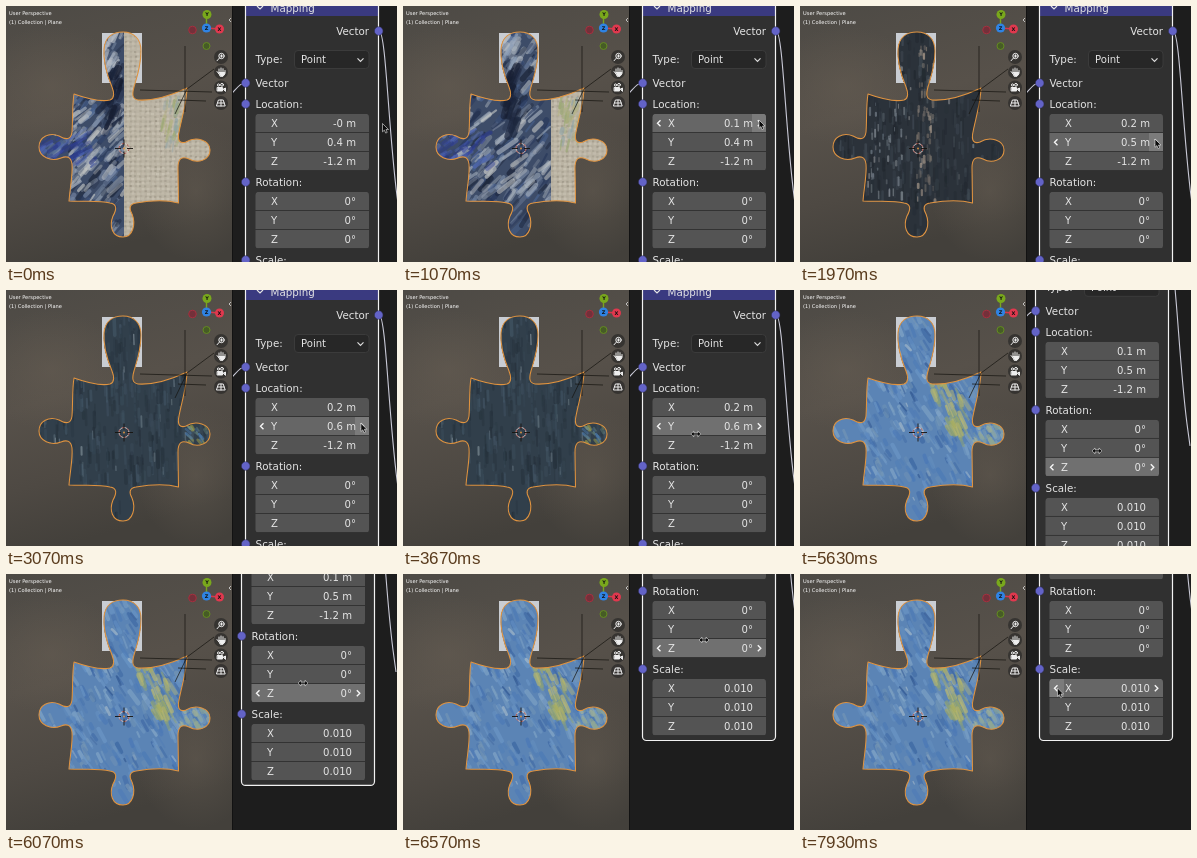
An HTML page with a canvas that plays this animation: 391 by 256 pixels, repeating every 8000 ms.

```html
<!DOCTYPE html>
<html lang="en">
<head>
<meta charset="utf-8">
<title>Mapping node</title>
<style>
html, body { margin: 0; width: 100%; height: 100%; overflow: hidden; background: #1d1d1d; }
#stage { position: relative; width: 391px; height: 256px; overflow: hidden; }
#stage > * { position: absolute; left: 0; top: 0; display: block; }
#stage > #editor { left: 226px; }
text { font: 10.1px "DejaVu Sans", sans-serif; fill: #e4e4e4; white-space: pre; }
.label { font-size: 10.3px; }
.info { font-size: 5.1px; fill: #fff; }
.axis { font-size: 5px; font-weight: bold; fill: #111; text-anchor: middle; }
.end { text-anchor: end; }
</style>
</head>
<body>
<div id="stage">
  <svg width="226" height="256">
    <defs>
      <linearGradient id="wall" x1="0" y1="0" x2=".25" y2="1">
        <stop offset="0" stop-color="#4d4a45"/>
        <stop offset=".45" stop-color="#57514a"/>
        <stop offset=".75" stop-color="#4e4943"/>
        <stop offset="1" stop-color="#43403b"/>
      </linearGradient>
      <radialGradient id="glow">
        <stop offset="0" stop-color="#675e53" stop-opacity=".5"/>
        <stop offset="1" stop-color="#675e53" stop-opacity="0"/>
      </radialGradient>
    </defs>
    <rect width="226" height="256" fill="url(#wall)"/>
    <ellipse cx="45" cy="80" rx="75" ry="60" fill="url(#glow)"/>
    <ellipse cx="190" cy="185" rx="60" ry="70" fill="url(#glow)"/>
    <rect x="96" y="27" width="40" height="50" fill="#c9cdd3"/>
  </svg>
  <canvas id="skin" width="226" height="256"></canvas>
  <svg width="226" height="256" fill="none">
    <path id="outline" stroke="#e0933f" stroke-width="1.05" stroke-linejoin="round"/>
    <path stroke="#15130f" stroke-width=".7" d="M179 40V106M134 84L206 86M181 83L208 63M172 94L200 95M181 83L169 108"/>
    <circle cx="118" cy="142.500" r="5" stroke="#ddd4d2" stroke-width=".9"/>
    <circle cx="118" cy="142.500" r="5" stroke="#a8423a" stroke-width=".9" stroke-dasharray="2.6 2.6"/>
    <path stroke="#17130f" stroke-width=".9" d="M109 142.500h6m6 0h6M118 133.500v6m0 6v6"/>
    <circle cx="118" cy="142.500" r=".9" fill="#e0933f"/>
    <text class="info" x="3" y="9">User Perspective</text>
    <text class="info" x="3" y="18">(1) Collection | Plane</text>
    <g stroke-width="1.4">
      <path stroke="#7aa51f" d="M200.500 21V9"/>
      <path stroke="#d8374c" d="M201 22L213 23"/>
      <circle cx="186.500" cy="24" r="3.800" fill="#74303a" stroke="#a5303f" stroke-width="1"/>
      <circle cx="200.500" cy="40" r="3.500" fill="#465c25" stroke="#648a22" stroke-width="1"/>
      <circle cx="201" cy="8.500" r="4.500" fill="#79a81c"/>
      <circle cx="213.500" cy="23" r="4.500" fill="#e0384e"/>
      <circle cx="200.500" cy="22" r="4.600" fill="#2f83e3"/>
    </g>
    <text class="axis" x="201" y="10.300">Y</text>
    <text class="axis" x="213.500" y="24.800">X</text>
    <text class="axis" x="200.500" y="23.800">Z</text>
    <path stroke="#ddd" stroke-width=".8" d="M225 12l-2 2 2 2"/>
    <g fill="#2c2b29" fill-opacity=".75">
      <circle cx="215" cy="51" r="7"/><circle cx="215" cy="66" r="7"/>
      <circle cx="215" cy="81.500" r="7"/><circle cx="215" cy="97" r="7"/>
    </g>
    <g stroke="#eee" stroke-width="1" stroke-linecap="round">
      <circle cx="215.500" cy="50" r="2.700"/>
      <path d="M213.500 52l-2.500 2.800M215.500 48.800v2.400M214.300 50h2.400"/>
      <path d="M213 66v-3M215 66v-4M217 66v-3.300M219 67v-2.500M211 65.500l2 2.500"/>
      <path fill="#eee" d="M213 66.500h5.800v1.500l-1.800 2.300h-2.500z"/>
      <path fill="#eee" d="M211.500 81.500h5v3.500h-5zM217.500 83l2-1v3z"/>
      <circle cx="212.500" cy="79" r="1.100"/><circle cx="216" cy="78.800" r="1.400"/>
      <path d="M212.800 94h4.400l2 6h-8.400zM215 94v6M211.800 97h6.400"/>
    </g>
  </svg>
  <svg id="editor" width="165" height="256" viewBox="226 0 165 256" fill="none">
    <defs><clipPath id="block"><rect x="249.500" y="-9.500" width="113.500" height="57" rx="3.500"/></clipPath></defs>
    <rect x="226" width="165" height="256" fill="#1d1d1d"/>
    <g id="node">
      <path stroke="#c9c9d6" stroke-width="1.1" d="M240 77C233 77 231 83 222 91M373 25C380 25 382 120 391 190L394 212"/>
      <rect x="239.500" y="-8" width="133" height="333" rx="4" fill="#303030"/>
      <path fill="#3a3a80" d="M240 10V-4q0-4 4-4H368q4 0 4 4V10z"/>
      <rect x="239.500" y="-8" width="133" height="333.500" rx="4" stroke="#f2f2f2" stroke-width="1.200"/>
      <path stroke="#e4e4e4" stroke-width="1.2" d="M251 0l3 3 3-3"/>
      <text class="label" x="264.500" y="6">Mapping</text>
      <text class="label end" x="363" y="28.500">Vector</text>
      <text class="label" x="249.600" y="57">Type:</text>
      <rect x="288.500" y="44.500" width="74.500" height="18" rx="3.500" fill="#272727" stroke="#3b3b3b"/>
      <text x="295" y="57">Point</text>
      <path stroke="#dcdcdc" stroke-width="1.2" d="M351.500 52.300l3 3 3-3"/>
      <text class="label" x="249.600" y="81">Vector</text>
    </g>
    <path stroke="#121212" d="M226.500 0V256"/>
    <g id="arrow"><path fill="#0b0b0b" stroke="#e8e8e8" stroke-width=".6" d="M0 0V8.300L1.900 6.600 3.200 9.600 4.700 8.900 3.500 6H6z"/></g>
    <g id="slide"><path fill="#0b0b0b" stroke="#e8e8e8" stroke-width=".6" d="M-5 0l3-2.900v1.900h4v-1.900L5 0 2 2.900V1h-4v1.900z"/></g>
  </svg>
</div>
<script>
const LOOP = 8000;
const $ = id => document.getElementById(id);

function el(parent, tag, attrs, label) {
  const e = document.createElementNS('http://www.w3.org/2000/svg', tag);
  for (const k in attrs) e.setAttribute(k, attrs[k]);
  if (label !== undefined) e.textContent = label;
  return parent.appendChild(e);
}

// Node fields
const rows = [];
function addBlock(title, y, values) {
  const node = $('node');
  el(node, 'text', { x: 249.6, y: y + 3.7, class: 'label' }, title);
  const g = el(node, 'g', { transform: `translate(0 ${y + 19.3})`, 'clip-path': 'url(#block)' });
  values.forEach((v, i) => {
    const c = i * 19;
    const bg = el(g, 'rect', { x: 249, y: c - 9.3, width: 115, height: 18.1, fill: '#545454' });
    const hot = el(g, 'g', { display: 'none' });
    const zones = [249, 349].map(x => el(hot, 'rect', { x, y: c - 9.3, width: 15, height: 18.1, fill: '#7b7b7b' }));
    el(hot, 'path', { d: `M257.500 ${c - 3}l-3 3 3 3M354.800 ${c - 3}l3 3-3 3`, stroke: '#f4f4f4', 'stroke-width': 1.4 });
    el(g, 'text', { x: 265, y: c + 3.7 }, 'XYZ'[i]);
    const text = el(g, 'text', { x: 350, y: c + 3.7, class: 'end' }, v);
    rows.push({ y: y + 19.3 + c, bg, hot, zones, text });
  });
}
addBlock('Location:', 98, ['-0 m', '0.4 m', '-1.2 m']);
addBlock('Rotation:', 176, ['0°', '0°', '0°']);
addBlock('Scale:', 254, ['0.010', '0.010', '0.010']);
[[239.7, 77], [239.7, 98], [239.7, 176], [239.7, 254], [372.7, 25]].forEach(([cx, cy]) =>
  el($('node'), 'circle', { cx, cy, r: 4.3, fill: '#6363c7', stroke: '#2b2b4a', 'stroke-width': .5 }));

// Jigsaw piece
const shape = 'M68 88C82 93 95 96 104 94C109 92 108 86 106 81C101 69 97 57 98 43C99 31 107 26 117 26' +
  'C128 26 135 33 135 45C135 60 131 71 128 81C126 88 126 93 132 94C147 95 164 90 181 82' +
  'C181 95 176 111 173 126C171 135 174 138 180 136C190 130 204 134 204 144C204 154 192 158 183 153' +
  'C176 150 172 152 172 162L172.500 197C157 193 142 195 130 197C123 198 123 203 126 208' +
  'C130 218 127 231 117 231C106 231 103 220 107 210C111 203 111 198 104 197C92 194 78 196 63 195' +
  'C64 182 67 168 66 158C65 150 60 150 55 152C45 156 33 151 33 141C33 131 43 126 53 130' +
  'C60 134 65 134 66 126C67 113 66 100 68 88Z';
$('outline').setAttribute('d', shape);
const piece = new Path2D(shape);

function rng(seed) {
  return () => (seed = (seed * 16807) % 2147483647) / 2147483647;
}

function dabs(c, seed, tones, n, box, lean, len, width) {
  const r = rng(seed);
  const [x0, y0, w, h] = box;
  c.lineCap = 'round';
  for (let i = 0; i < n; i++) {
    const x = x0 + r() * w, y = y0 + r() * h, l = len * (.4 + r());
    c.strokeStyle = tones[Math.floor(r() * tones.length)];
    c.globalAlpha = .25 + r() * .45;
    c.lineWidth = width * (.5 + r());
    c.beginPath();
    c.moveTo(x, y);
    c.lineTo(x + l * lean * (.6 + r() * .8), y + l);
    c.stroke();
  }
  c.globalAlpha = 1;
}

function makeSkin(paint) {
  const cv = document.createElement('canvas');
  cv.width = 226;
  cv.height = 256;
  const c = cv.getContext('2d');
  c.clip(piece);
  paint(c);
  return cv;
}

function fill(c, color) {
  c.fillStyle = color;
  c.fillRect(0, 0, 226, 256);
}

const ALL = [28, 15, 185, 215];

// Blue painted cloth up to the seam, pale canvas weave beyond it
const woven = (seam, seed) => makeSkin(c => {
  fill(c, '#bab3a3');
  const r = rng(seed);
  for (let y = 24; y < 234; y += 5) {
    for (let x = seam; x < 208; x += 5) {
      c.globalAlpha = .15 + r() * .4;
      c.fillStyle = '#8b8475';
      c.fillRect(x + r(), y + r(), 2.2, 2);
      c.fillStyle = '#d5cfc0';
      c.fillRect(x + 2 + r(), y + 2 + r(), 3, 2.4);
    }
  }
  c.globalAlpha = 1;
  dabs(c, seed + 1, ['#9aa874', '#8fa5a8', '#b4b283'], 38, [157, 90, 20, 45], -.2, 9, 3);
  c.save();
  c.beginPath();
  c.rect(0, 0, seam, 256);
  c.clip();
  fill(c, '#3d4c68');
  dabs(c, seed + 2, ['#1b2438', '#26365a', '#4a6492', '#7d8ea9', '#a9b1ba'], 420, [28, 15, seam - 28, 215], -.8, 9, 4);
  dabs(c, seed + 5, ['#c3c5c4', '#a4afbd'], 55, [66, 100, seam - 60, 90], -1.1, 9, 3.5);
  dabs(c, seed + 6, ['#b9bfc6', '#8fa0b8'], 40, [96, 26, 22, 40], -.6, 7, 4);
  dabs(c, seed + 3, ['#3646a0', '#2b3a86', '#5068b4'], 70, [30, 122, 60, 36], -1.4, 6, 3);
  dabs(c, seed + 4, ['#161d30', '#1e2840'], 34, [104, 55, 14, 60], -.4, 12, 5);
  c.restore();
});

const skins = {
  seam: woven(118, 11),
  seam1: woven(148, 23),
  seam2: woven(208, 37),
  dark: makeSkin(c => {
    fill(c, '#2b323a');
    dabs(c, 51, ['#20262d', '#262d35', '#353e47', '#434d57'], 600, ALL, 0, 12, 2.6);
    dabs(c, 52, ['#8b7f74', '#a89a8c', '#6e6a66'], 70, [117, 30, 18, 165], 0, 5, 2);
    dabs(c, 53, ['#7a8791', '#8f9092'], 60, ALL, 0, 4, 1.6);
    dabs(c, 54, ['#8a9299', '#77818b'], 35, [70, 92, 36, 95], 0, 6, 1.7);
  }),
  slate: makeSkin(c => {
    fill(c, '#313f4b');
    dabs(c, 61, ['#242f39', '#2a3742', '#394a58', '#435666'], 600, ALL, .03, 14, 2.6);
    dabs(c, 62, ['#71828e', '#87959d'], 75, ALL, .03, 10, 1.5);
    dabs(c, 63, ['#a3a34c', '#6f8f86', '#4a78a8'], 26, [180, 134, 20, 18], .8, 4, 2);
  }),
  blue: makeSkin(c => {
    fill(c, '#5b84b5');
    dabs(c, 71, ['#3c66a3', '#4a78b6', '#6b96c6', '#86a9c9', '#7697b5'], 650, ALL, .55, 9, 3.4);
    dabs(c, 72, ['#a9bccb', '#2f5590'], 60, ALL, .7, 6, 2);
    dabs(c, 73, ['#a8ad5e', '#b9b873', '#8fa375'], 26, [130, 70, 14, 32], .5, 10, 3);
    dabs(c, 74, ['#a8ad5e', '#b9b873', '#8fa375'], 40, [146, 98, 16, 42], .5, 12, 3);
    dabs(c, 75, ['#8fa794', '#a5b39a', '#7f9fb2'], 40, [174, 130, 28, 24], .6, 5, 3);
  })
};

// time, texture, X, Y
const steps = [
  [0, 'seam', '-0 m', '0.4 m'],
  [640, 'seam1', '0.1 m', '0.4 m'],
  [1120, 'seam2', '0.2 m', '0.4 m'],
  [1870, 'dark', '0.2 m', '0.5 m'],
  [2200, 'slate', '0.2 m', '0.6 m'],
  [3960, 'dark', '0.2 m', '0.5 m'],
  [4400, 'blue', '0.1 m', '0.5 m']
];

// time, x, y
const mouse = [
  [0, 376.5, 117.5], [200, 376.5, 117.5], [560, 356, 114], [1400, 356, 114],
  [1700, 355, 133], [3070, 355, 133], [3330, 325, 196], [3670, 293, 144],
  [3870, 256, 136], [4120, 256, 136], [4330, 254.5, 120], [4770, 254.5, 120],
  [5230, 301, 225], [5400, 301, 225], [5630, 297, 161], [6200, 297, 94],
  [6570, 301, 66], [6800, 301, 66], [7530, 266, 116], [7630, 266, 116], [7930, 257.5, 114]
];
const pan = [[0, 0, 0], [5400, 0, 0], [5630, -4, -56], [6200, -4, -131], [6570, 0, -159]];

function at(keys, t) {
  let i = keys.length - 1;
  while (keys[i][0] > t) i--;
  const a = keys[i], b = keys[i + 1] || a;
  const p = b === a ? 0 : (t - a[0]) / (b[0] - a[0]);
  return [a[1] + (b[1] - a[1]) * p, a[2] + (b[2] - a[2]) * p];
}

const ctx = $('skin').getContext('2d');
function drawSkin(i, t) {
  ctx.globalAlpha = 1;
  ctx.clearRect(0, 0, 226, 256);
  if (i) ctx.drawImage(skins[steps[i - 1][1]], 0, 0);
  ctx.globalAlpha = i ? Math.min(1, (t - steps[i][0]) / 80) : 1;
  ctx.drawImage(skins[steps[i][1]], 0, 0);
}

function place(id, x, y, on) {
  $(id).setAttribute('transform', `translate(${x} ${y})`);
  $(id).setAttribute('display', on ? 'inline' : 'none');
}

function draw(t) {
  let i = steps.length - 1;
  while (steps[i][0] > t) i--;
  drawSkin(i, t);
  rows[0].text.textContent = steps[i][2];
  rows[1].text.textContent = steps[i][3];

  const [px, py] = at(pan, t);
  $('node').setAttribute('transform', `translate(${px} ${py})`);

  const [mx, my] = at(mouse, t);
  const x = mx - px, y = my - py;
  const dragging = t > 5380 && t < 6600;
  const inside = x > 249 && x < 363;
  const hover = dragging ? rows[5] : inside && rows.find(r => Math.abs(r.y - y) < 9.5);
  const left = x < 264, right = x > 349;
  for (const r of rows) {
    const on = r === hover;
    r.bg.setAttribute('fill', on ? (left || right ? '#666' : '#707070') : '#545454');
    r.hot.setAttribute('display', on ? 'inline' : 'none');
    r.zones[0].setAttribute('display', left ? 'inline' : 'none');
    r.zones[1].setAttribute('display', right ? 'inline' : 'none');
  }
  const slide = hover && !left && !right;
  place('slide', mx, my, slide);
  place('arrow', mx, my, !slide);
}

const start = performance.now();
function tick(now) {
  draw(Math.max(0, now - start) % LOOP);
  requestAnimationFrame(tick);
}
tick(start);
</script>
</body>
</html>
```
